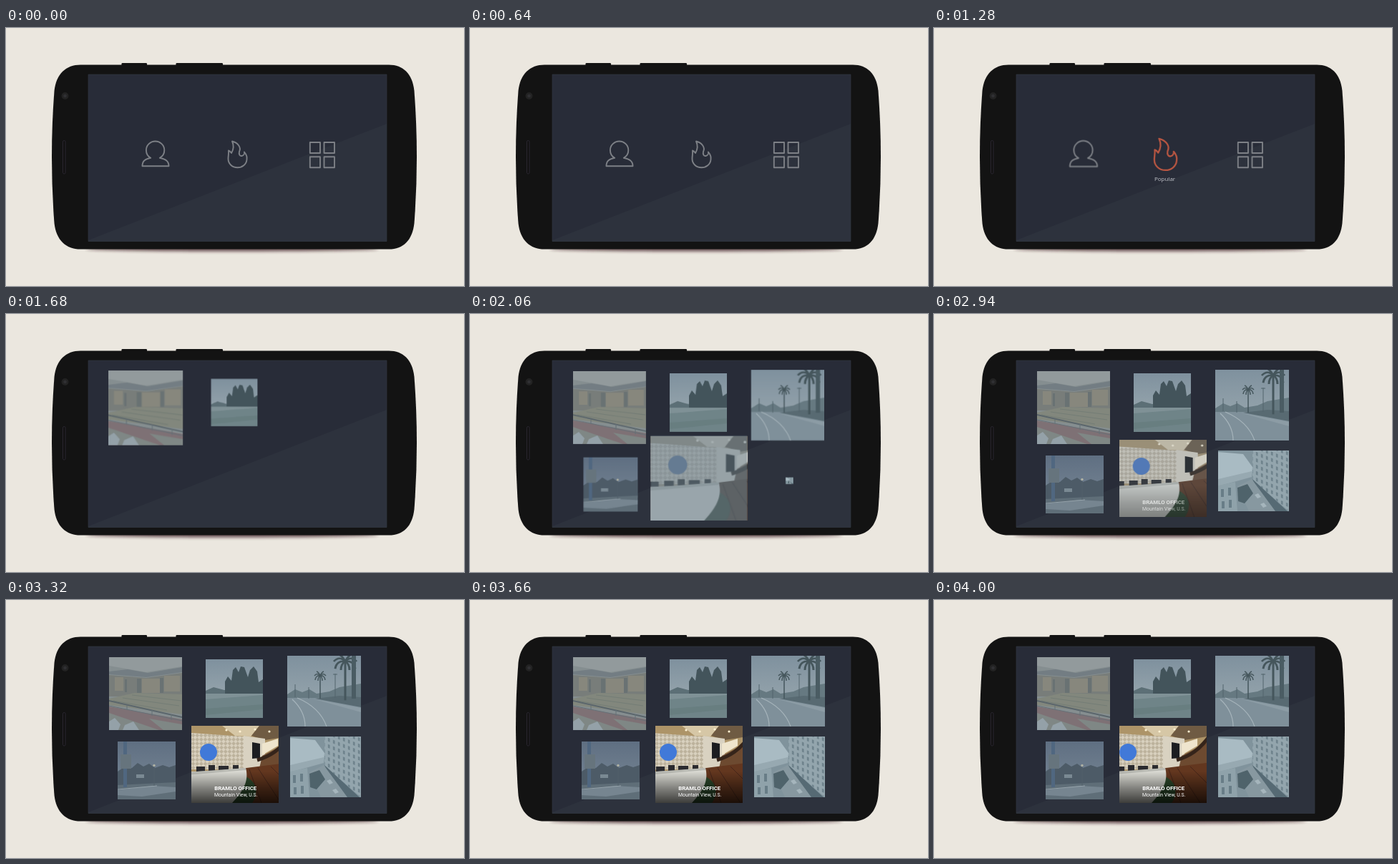
Write an HTML page that moves like this. It is 640 by 361 pixels and loops after 4.02 s.

```html
<!DOCTYPE html>
<html lang="en">
<head>
<meta charset="utf-8">
<title>Phone gallery</title>
<style>
html, body { margin: 0; width: 100%; height: 100%; overflow: hidden; background: #ebe7df; }
.stage { display: block; width: 100vw; height: 100vh; }

.icons, .person, .flame, .label, .gallery, .photo, .pan, .mute, .tint, .caption {
  animation: 4020ms linear infinite both;
}
.icon { fill: none; stroke: #7d8086; stroke-width: 1.9; stroke-linejoin: round; }
.icons { animation-name: leave; }
.person { animation-name: person; transform-origin: 209px 176px; }
.flame { animation-name: heat; transform-origin: 323.5px 177px; }
.label { animation-name: label; font: 8px "Open Sans", sans-serif; fill: #c3c6cc; }

.gallery { animation-name: gate; }
.photo { animation-name: pop; animation-delay: calc(var(--i) * 105ms); }
.pan { animation-name: pan; }
.mute { animation-name: mute; }
.tint { animation-name: tint; }
.caption { animation-name: caption; font-family: Roboto, sans-serif; fill: #fff; }
.title { font-size: 7.8px; font-weight: 700; }
.place { font-size: 6.9px; }

@keyframes leave { 0%, 34.8% { opacity: 1 } 37.3%, 100% { opacity: 0 } }
@keyframes person { 0%, 26% { transform: none } 30.5%, 100% { transform: scale(1.035) } }
@keyframes heat {
  0%, 26% { transform: none; stroke: #7d8086 }
  30.5%, 100% { transform: scale(1.2); stroke: #b75642 }
}
@keyframes label { 0%, 27% { opacity: 0 } 31%, 100% { opacity: 1 } }
/* hides photos whose delay carries them past the loop end */
@keyframes gate { 0%, 37.6% { opacity: 0 } 37.61%, 100% { opacity: 1 } }
@keyframes pop {
  0%, 37.69% { transform: scale(0) }
  38.18% { transform: scale(.09) }
  39.18% { transform: scale(.8) }
  39.93% { transform: scale(1.15) }
  40.8% { transform: scale(1.107) }
  41.79% { transform: scale(1.03) }
  43.41% { transform: scale(.937) }
  44.78% { transform: scale(.98) }
  46.02% { transform: scale(1.003) }
  48.13%, 100% { transform: none }
}
@keyframes pan { 0%, 68.4% { transform: none } 100% { transform: translateX(-22.3px) } }
@keyframes mute { 0%, 68.4% { filter: saturate(.4) } 76%, 100% { filter: saturate(1) } }
@keyframes tint { 0%, 68.4% { opacity: .58 } 76%, 100% { opacity: 0 } }
@keyframes caption { 0%, 69.5% { opacity: 0 } 77%, 100% { opacity: 1 } }
</style>
</head>
<body>
<svg class="stage" viewBox="0 0 640 361" preserveAspectRatio="none">
  <defs>
    <filter id="soft" x="-10%" y="-200%" width="120%" height="500%"><feGaussianBlur stdDeviation="2.2"/></filter>
    <linearGradient id="sky" x2="0" y2="1"><stop stop-color="#7f919e"/><stop offset="1" stop-color="#95a4ac"/></linearGradient>
    <linearGradient id="dusk" x2="0" y2="1"><stop stop-color="#5f6f82"/><stop offset="1" stop-color="#748392"/></linearGradient>
    <linearGradient id="fade" x2="0" y2="1"><stop stop-opacity="0"/><stop offset=".5" stop-opacity=".38"/><stop offset="1" stop-opacity=".72"/></linearGradient>
    <pattern id="tiles" width="8" height="8" patternUnits="userSpaceOnUse" patternTransform="rotate(45)">
      <path fill="#d8d0be" d="M0 0h8v8H0z"/><path fill="#bcb29c" d="M0 0h4v4H0zM4 4h4v4H4z"/>
    </pattern>
    <pattern id="panes" width="7" height="9" patternUnits="userSpaceOnUse" patternTransform="skewY(22)">
      <path fill="#93a5ad" d="M0 0h7v9H0z"/><path fill="#6b7f89" d="M2 2h2.500v5H2z"/>
    </pattern>
    <g id="palm" fill="none" stroke="#45565c" stroke-width="1.500">
      <path d="M0 0V32"/>
      <path d="M0 0Q-4-5-8 0M0 0Q4-5 8 0M0 0Q-6-1-7 6M0 0Q6-1 7 6M0 0Q-2-5-5-6M0 0Q2-5 5-6M0 0Q-3 2-3 7M0 0Q3 2 3 7"/>
    </g>
  </defs>

  <path fill="#ebe7df" d="M0 0h640v361H0z"/>

  <g>
    <ellipse cx="316" cy="309" rx="204" ry="3.600" fill="#3b1c22" opacity=".75" filter="url(#soft)"/>
    <g fill="#131313">
      <rect x="161.500" y="49" width="35.500" height="6" rx="1.200"/>
      <rect x="237.500" y="49" width="65.500" height="6" rx="1.200"/>
      <path d="M104 51.400H535C555 51.400 568 64 570.500 88Q574 134 574 180.500T570.500 273C568 297 555 309.600 535 309.600H104C84 309.600 70 297 67.500 273Q64 227 64 180.500T67.500 88C70 64 84 51.400 104 51.400Z"/>
    </g>
    <circle cx="82.500" cy="95" r="5" fill="#232323"/>
    <circle cx="82.500" cy="95" r="2.300" fill="#303033"/>
    <rect x="79.500" y="157.500" width="3.500" height="46.500" rx="1.700" fill="#111" stroke="#2b2731"/>
    <path fill="#282c38" d="M115 65H532V298.500H115Z"/>
    <path fill="#2d323d" d="M115 297 532 134V298.500H115Z"/>
    <path fill="none" stroke="#353944" stroke-width=".6" d="M115 65H532V298.500H115Z"/>
  </g>

  <g class="icons">
    <path class="icon person" d="M190.500 193.300H227.500C227.500 186 223 183.500 214.800 181.800C219 179.500 221.300 175.300 221.300 171A12.700 12.500 0 0 0 195.900 171C195.900 175.300 198 179.500 202.200 181.800C194 183.500 190.500 186 190.500 193.300Z"/>
    <path class="icon flame" d="M316 158.500C324 160.500 329 167 326 173C325 177 327 179.500 329.500 179C332 178.500 333.500 176 333 173.500C336 177 337 181 336.500 184C336 191 330 195.300 323.500 195.300C316 195.300 310.500 190 310.500 183C310.500 179 311.500 175 311 171.500C313 172 314 173.500 315 175C318 170 318.500 164 316 158.500Z"/>
    <path class="icon" d="M424.800 160h14.200v15h-14.200zM444.500 160h14.500v15h-14.500zM424.800 180.200h14.200v15h-14.200zM444.500 180.200h14.500v15h-14.500z"/>
    <text class="label" x="322.500" y="214.300" text-anchor="middle">Popular</text>
  </g>

  <g class="gallery">
    <!-- auditorium -->
    <g class="photo" style="--i:0; transform-origin:194.800px 131px">
      <svg x="144" y="80" width="101.500" height="102" viewBox="144 80 101.500 102">
        <path fill="#858e90" d="M144 80h102v102H144z"/>
        <path fill="#929a9c" d="M144 80H246V93L196 101 144 92Z"/>
        <path fill="#737d83" d="M170 97 198 102 246 94V101L196 108 144 104V100Z"/>
        <path fill="#787d7a" d="M144 105 196 109 246 102V135H144Z"/>
        <path fill="#87877d" d="M152 108h12v19h-12zM190 110h25v20h-25zM221 106h22v22h-22z"/>
        <path fill="#697273" d="M166 111h3v18h-3zM183 110h6v20h-6zM215 109h5v21h-5z"/>
        <path fill="#82877d" d="M144 138 180 130 246 132V160L144 147Z"/>
        <path stroke="#747d76" fill="none" d="M150 141 225 154M163 137 242 148M176 133 245 141"/>
        <path fill="#7e7175" d="M144 149 246 167V182H144Z"/>
        <path fill="#7f8785" d="M144 158 214 182H144ZM200 166 246 174V182H220Z"/>
        <path stroke="#5b666c" stroke-width="1.800" fill="none" d="M144 141 246 164"/>
        <path stroke="#657077" fill="none" d="M144 148 246 169M169 147v7M204 154v8M231 160v8"/>
        <path fill="#94a1a8" d="M144 170 152 165 160 174 157 182H144ZM166 175 178 170 186 182H163Z"/>
      </svg>
    </g>

    <!-- field and trees -->
    <g class="photo" style="--i:1; transform-origin:319px 124px">
      <svg x="279" y="83.500" width="80" height="81" viewBox="279 83.500 80 81">
        <path fill="url(#sky)" d="M279 83h80v52h-80z"/>
        <path fill="#5c6f76" d="M279 127 290 122 305 126 359 121V133H279Z"/>
        <path fill="#43545b" d="M306 131V114L310 107 315 113 317 98 321 94 325 101 328 93 333 94 338 108 341 98 346 93 351 100 353 115 359 111V132Z"/>
        <path fill="#7f9196" d="M279 131H359V142H279Z"/>
        <path fill="#6f8488" d="M279 139 359 133V165H279Z"/>
        <path fill="#687e80" d="M279 152 359 146V153L279 161Z"/>
      </svg>
    </g>

    <!-- palm road -->
    <g class="photo" style="--i:2; transform-origin:444.500px 127.500px">
      <svg x="393.500" y="78" width="102" height="99" viewBox="393.500 78 102 99">
        <path fill="url(#sky)" d="M393 78h103v65H393z"/>
        <path fill="#667981" d="M393 132 404 125 414 129 424 125 434 131 452 128 466 122 496 117V142H393Z"/>
        <path fill="#7f909a" d="M393 137H496V177H393Z"/>
        <path fill="#586a72" d="M432 138 466 134 496 136V150Z"/>
        <path fill="#8c9ca5" d="M428 138 496 151V157Z"/>
        <path fill="none" stroke="#a6b4bb" stroke-width="1.200" d="M407 137C426 145 441 157 448 177M400 139C412 150 418 163 418 177"/>
        <use href="#palm" x="439" y="106"/>
        <use href="#palm" transform="translate(474 86) scale(2 1.700)"/>
        <path fill="#4a5c63" d="M483 78h6v60h-6z"/>
        <path fill="none" stroke="#53656d" d="M460 103V137M457 104h6M423 122V138M404 118V136"/>
      </svg>
    </g>

    <!-- roadside -->
    <g class="photo" style="--i:3; transform-origin:196.500px 238.300px">
      <svg x="156" y="198" width="81" height="81" viewBox="156 198 81 81">
        <path fill="url(#dusk)" d="M156 198h81v60h-81z"/>
        <path fill="#4d5b67" d="M156 240 166 233 176 235 184 228 192 233 200 229 208 235 219 231 228 234 237 231V264H156Z"/>
        <path fill="#5f6e78" d="M156 259 237 255V279H156Z"/>
        <path fill="#768590" d="M156 266 204 260 237 262V268L190 275 156 273Z"/>
        <path stroke="#95a2aa" d="M156 265 211 260"/>
        <path fill="#506780" d="M164 198h5v64h-5z"/>
        <path fill="#66747d" d="M160 216h15v20h-15z"/>
        <path fill="#7a8993" d="M182 244h11v5h-11z"/>
        <path stroke="#52606a" d="M207 233V260"/>
        <circle cx="207" cy="231.500" r="1.700" fill="#b0b2a4"/>
      </svg>
    </g>

    <!-- office lobby -->
    <g class="photo" style="--i:4; transform-origin:320px 229.700px">
      <svg x="259" y="176" width="122" height="107.500" viewBox="259 176 122 107.500">
        <g class="mute"><g class="pan">
          <path fill="#ad9468" d="M255 176H410V284H255Z"/>
          <path fill="url(#tiles)" d="M255 185 342 191V237H255Z"/>
          <path fill="#d6c7a6" d="M312 176H364L352 191 330 190Z"/>
          <path fill="#6f5b43" d="M364 176H410V190L372 196 353 190Z"/>
          <g fill="#fff3d5"><circle cx="318" cy="182" r="1.600"/><circle cx="337" cy="184" r="1.600"/><circle cx="358" cy="181" r="1.600"/><circle cx="378" cy="184" r="1.600"/></g>
          <path fill="#d9d2c1" d="M342 190 372 194V238H342Z"/>
          <path fill="#1c1d20" d="M354 199 365 201V221L354 222Z"/>
          <path fill="#6d4a30" d="M368 218 410 196V240H363Z"/>
          <path fill="#efe5cd" d="M368 201 390 194V204L368 217Z"/>
          <path fill="none" stroke="#35241a" stroke-width="5" d="M361 224C378 219 393 211 410 186"/>
          <path fill="#63371f" d="M338 236 410 227V284H320Z"/>
          <path stroke="#46261a" d="M362 235 394 284M380 233 410 263M350 237 367 284"/>
          <path fill="#2d4a2c" d="M345 247C363 256 362 273 354 284H322Z"/>
          <circle cx="293" cy="213" r="12" fill="#4179d8"/>
          <path fill="#2a2a2e" d="M258 234h11v8h-11zM276 233h12v8h-12zM293 231h9v9h-9zM307 232h14v8h-14zM327 231h8v8h-8z"/>
          <path fill="#d9d9d2" d="M250 241 302 239 345 235C349 250 345 264 326 284H250Z"/>
          <path fill="#b9bab3" d="M250 242 345 235V238L250 246Z"/>
        </g></g>
        <path class="tint" fill="#6b7f8b" d="M259 176h122v108H259z"/>
        <g class="caption">
          <path fill="url(#fade)" d="M259 240h122v44H259z"/>
          <g text-anchor="middle">
            <text class="title" x="320.700" y="265.500">BRAMLO OFFICE</text>
            <text class="place" x="321.300" y="274.700">Mountain View, U.S.</text>
          </g>
        </g>
      </svg>
    </g>

    <!-- street from above -->
    <g class="photo" style="--i:5; transform-origin:446.500px 233.300px">
      <svg x="397.500" y="191.500" width="98" height="84" viewBox="397.500 191.500 98 84">
        <path fill="#80939c" d="M397 191h99v85h-99z"/>
        <path fill="url(#panes)" d="M445 191H496V276L445 232Z"/>
        <path fill="#566a74" d="M445 231 494 276H461Z"/>
        <path fill="#8798a0" d="M424 241 444 231 477 276H440Z"/>
        <path fill="#a9bbc3" d="M397 193 432 196 445 214 444 227 397 239Z"/>
        <path fill="#97a9b1" d="M397 231 444 220V228L397 241Z"/>
        <path fill="#8fa2aa" d="M397 240 421 235 424 276H397Z"/>
        <path fill="#687d87" d="M401 245h4v11h-4zM411 243h4v11h-4zM402 262h4v10h-4zM412 260h4v11h-4z"/>
        <path fill="#4f636b" d="M424 243 438 238 446 251 434 265 425 262Z"/>
        <path fill="#a5b5bc" d="M448 253l5-2 4 5-5 2zM456 266l5-2 4 5-5 2z"/>
      </svg>
    </g>
  </g>
</svg>
</body>
</html>
```
